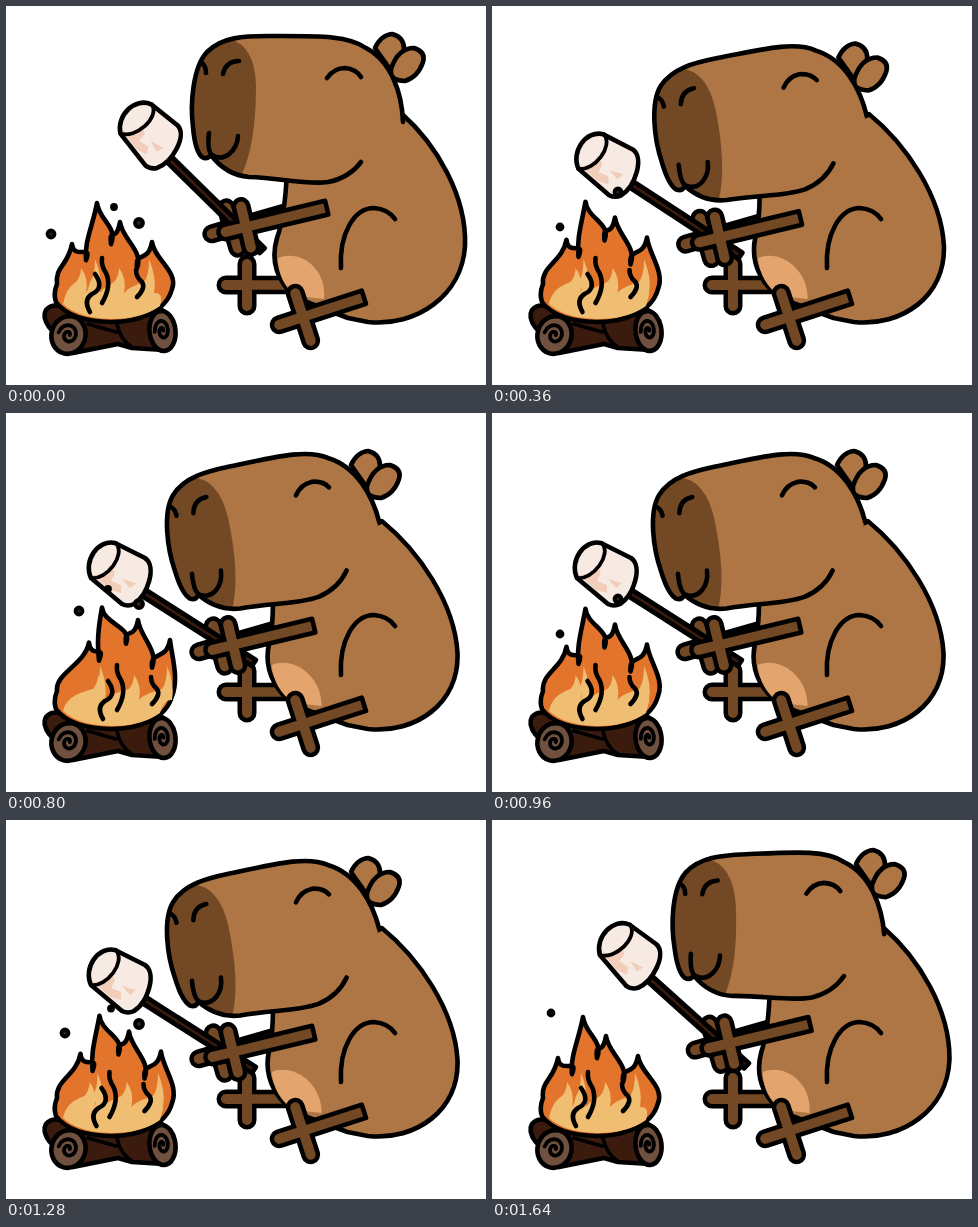
These frames come from a looping animation (480 px wide and 379 px high, 1.76 s). An HTML page:

```html
<!DOCTYPE html>
<html lang="en">
<head>
<meta charset="utf-8">
<title>Campfire capybara</title>
<style>
html, body { margin: 0; width: 100%; height: 100%; overflow: hidden; background: #fff; }
svg { display: block; width: 100vw; height: 100vh; }
.ink { stroke: #000; stroke-width: 4.6; stroke-linecap: round; stroke-linejoin: round; }
.line { fill: none; }
.thin { stroke-width: 3.8; }
.fur { fill: #ae7645; }
.dark { fill: #734925; }
.bark { fill: #3b1b0e; }
.wood { fill: #70503f; }
.toe { fill: none; stroke: #734925; stroke-width: 10; stroke-linecap: round; }
.toe.edge { stroke: #000; stroke-width: 19; }
</style>
</head>
<body>
<svg viewBox="0 0 480 379">
  <g id="farFoot"></g>
  <g id="farArm"></g>

  <g id="body">
    <path class="ink fur" d="M281 165L396 108C430 138 461 190 459 240C456 290 410 321 362 316L342 312L290 292C272 276 264 256 271 232Q279 210 281 165Z"/>
    <path fill="#e3a46e" d="M272 252C294 243 321 262 318 293L290 290Q272 276 272 252Z"/>
  </g>
  <path class="ink line" d="M335 262C333 228 348 202 368 202Q382 203 389 213"/>

  <g id="ears">
    <path class="ink fur" d="M369 42Q375 29 386 28Q398 31 398 43L386 66Z"/>
    <path class="ink fur" d="M385 63Q392 42 408 42Q420 46 417 56Q412 71 399 75Q390 75 385 70Z"/>
  </g>

  <g id="head">
    <path class="fur" d="M397 116C396 88 386 56 360 42C342 29 312 30 262 30C238 30 216 31 201 46C187 61 184 97 187 121Q189 145 196 151Q201 154 205 149Q220 169 243 171C275 172 300 179 322 176Q343 172 355 156Z"/>
    <path class="dark" d="M224 33Q249 40 250 80Q250 139 235 170Q218 166 205 149Q201 154 196 151Q189 145 187 121C184 97 187 61 201 46Q210 36 224 33Z"/>
    <path class="ink line" d="M397 116C396 88 386 56 360 42C342 29 312 30 262 30C238 30 216 31 201 46C187 61 184 97 187 121Q189 145 196 151Q201 154 205 149Q220 169 243 171C275 172 300 179 322 176Q343 172 355 156"/>
    <path class="ink line" d="M203 127Q201 145 206 149C219 157 231 144 232 130M217 68Q220 55 233 55M196 57Q200 60 200 67M321 72Q328 62 339 62Q350 63 355 71"/>
  </g>

  <g id="stick">
    <path class="ink bark" d="M136 183L140 177L250 247L246 253Z"/>
    <path class="ink" fill="#f6eae2" d="M85 165C77 148 92 126 109 130L139 145C151 153 142 182 128 191Q122 194 116 191Z"/>
    <path fill="#f2cdb9" d="M87 162Q98 163 104 152L109 160L105 168L115 172V180L104 177ZM116 166L130 170L124 175Z"/>
    <path class="ink line thin" d="M85 165C101 167 120 142 110 130"/>
  </g>

  <g id="nearArm"></g>
  <g id="nearFoot"></g>

  <path class="ink bark" d="M43 321Q36 311 40 304Q45 298 54 300L105 310L156 304L164 310L158 344L126 342L112 338L67 347Z"/>
  <path class="ink line thin" d="M82 318L110 326M111 318Q114 334 127 342"/>
  <g id="logEnds"></g>

  <path id="flame" class="ink" fill="#e2752b"/>
  <path id="core" fill="#f0be73"/>
  <path id="licks" class="ink line"/>
  <path id="embers" class="ink thin" fill="#302018"/>
</svg>
<script>
const LOOP = 1760;
const $ = id => document.getElementById(id);
const set = (id, name, value) => $(id).setAttribute(name, value);

// Times of each new flame drawing (five per flicker) and of each new body pose
const BEATS = [0, 120, 200, 360, 480, 600, 680, 800, 920, 1040, 1160, 1280, 1360, 1440, 1560];
const POSES = [0, 120, 200, 320, 360, 400, 440, 480, 1440, 1560, 1640];

// A bar with three toes that form a cross around the palm
function limb(id, x, y, angle, len, toe) {
  const toes = `M0 ${-toe}V${toe}M0 0H${-toe}`;
  $(id).innerHTML = `<g transform="translate(${x} ${y}) rotate(${angle})">
    <path class="toe edge" d="${toes}"/>
    <path class="ink dark" d="M0 -7H${len}V7H0Z"/>
    <path class="toe" d="${toes}"/></g>`;
}
limb('farFoot', 241, 279, 0, 42, 21);
limb('farArm', 226, 222, -16, 58, 21);
limb('nearArm', 240, 221, -13.5, 83, 21);
limb('nearFoot', 297, 311, -18, 64, 25);

function spiral(x, y, rx, ry) {
  let d = '';
  for (let i = 0; i <= 22; i++) {
    const a = i * .42, r = .6 - i * .024;
    d += `${i ? 'L' : 'M'}${x - rx * r * Math.cos(a)} ${y - ry * r * Math.sin(a)}`;
  }
  return d;
}
const logEnd = (x, y, rx, ry, tilt) => `<g transform="rotate(${tilt} ${x} ${y})">
  <ellipse class="ink wood" cx="${x}" cy="${y}" rx="${rx}" ry="${ry}"/>
  <path class="ink line thin" d="${spiral(x, y, rx, ry)}"/></g>`;
$('logEnds').innerHTML = logEnd(62.5, 329, 17, 19, 15) + logEnd(156.5, 325, 13, 20, -6);

// Flame tips and valleys in turn: x, y, sideways sway
const EDGE = [[66, 238, 17], [80, 254, 13], [91, 197, 5], [105, 238, 15],
  [114, 216, 18], [131, 262, 15], [146, 236, 18]];

// Sparks: first and last drawing, x, y, step in x and y, size
const SPARKS = [[0, 2, 45, 228, 14, -15, 3.5], [0, 2, 108, 201, -3, -12.5, 2],
  [0, 2, 133, 217, 0, -13, 4], [3, 4, 68, 221, -9, -28, 2.5], [3, 3, 126, 186, 0, 0, 3.5]];

const flameEdge = sway => EDGE.map(([x, y, reach]) => [x + reach * sway, y - reach * sway * .5]);

function flamePath(edge) {
  let d = 'M50 296Q47 288 51 278', [px, py] = [51, 278];
  [...edge, [166, 283]].forEach(([x, y], i) => {
    d += i % 2
      ? `C${px + 2} ${py + 17} ${x + 7} ${y - 17} ${x} ${y}`
      : `C${px - 2} ${py - 18} ${x - 4} ${y + 22} ${x} ${y}`;
    [px, py] = [x, y];
  });
  return d + 'C160 306 132 316 105 316Q64 315 50 296Z';
}

function corePath(edge) {
  let d = 'M57 298', px = 57;
  [edge[0][0] + 9, edge[2][0] - 2, edge[3][0] + 8, edge[6][0] - 3].forEach((x, i) => {
    const top = i % 2 ? 253 : 262;
    d += `Q${px + 3} 282 ${x - 5} 276Q${x} 270 ${x} ${top}Q${x + 8} 272 ${x + 5} 287`;
    px = x + 5;
  });
  return d + 'Q158 286 154 300Q136 313 105 313Q72 312 57 298Z';
}

function lickPath(edge) {
  const [left, mid, right] = [1, 3, 5].map(i => edge[i][0]);
  return `M${mid - 9} 252q-1 8 4 15q6 13 -4 30M${left + 9} 268q10 14 -3 20q-9 6 -2 18` +
    `M${right - 1} 264q0 7 6 12q4 6 -5 15`;
}

const sparkPath = pose => SPARKS
  .filter(([first, last]) => first <= pose && pose <= last)
  .map(([first, , x, y, dx, dy, r]) => {
    const n = pose - first;
    return `M${x + dx * n - r} ${y + dy * n}a${r} ${r} 0 1 0 ${2 * r} 0a${r} ${r} 0 1 0 ${-2 * r} 0Z`;
  }).join('');

function lean(t) {
  const down = Math.min(1, t / 420);
  const back = Math.min(1, (LOOP - t) / 320);
  return down * down * (3 - 2 * down) * back ** 1.6;
}

const lastIndex = (list, t) => list.findLastIndex(time => time <= t);

function render(t) {
  const p = lean(POSES[lastIndex(POSES, t)]), up = 1 - p;
  const skew = .096 * p;
  const reach = `translate(${-13 * p} ${11 * p})`;
  set('head', 'transform', `rotate(${-12 * p} 355 225)`);
  set('ears', 'transform', `translate(${-24 * p} ${10 * p})`);
  set('body', 'transform', `matrix(1 0 ${skew} 1 ${-318 * skew} 0)`);
  set('farArm', 'transform', reach);
  set('nearArm', 'transform', reach);
  set('stick', 'transform', `translate(${13 * up} ${-11 * up}) rotate(${12 * up} 219 230)`);

  const pose = lastIndex(BEATS, t) % 5;
  const edge = flameEdge(1 - Math.abs(pose - 2) / 2);
  set('flame', 'd', flamePath(edge));
  set('core', 'd', corePath(edge));
  set('licks', 'd', lickPath(edge));
  set('embers', 'd', sparkPath(pose));
}

const start = performance.now();
function tick() {
  render((performance.now() - start) % LOOP);
  requestAnimationFrame(tick);
}
tick();
</script>
</body>
</html>
```
